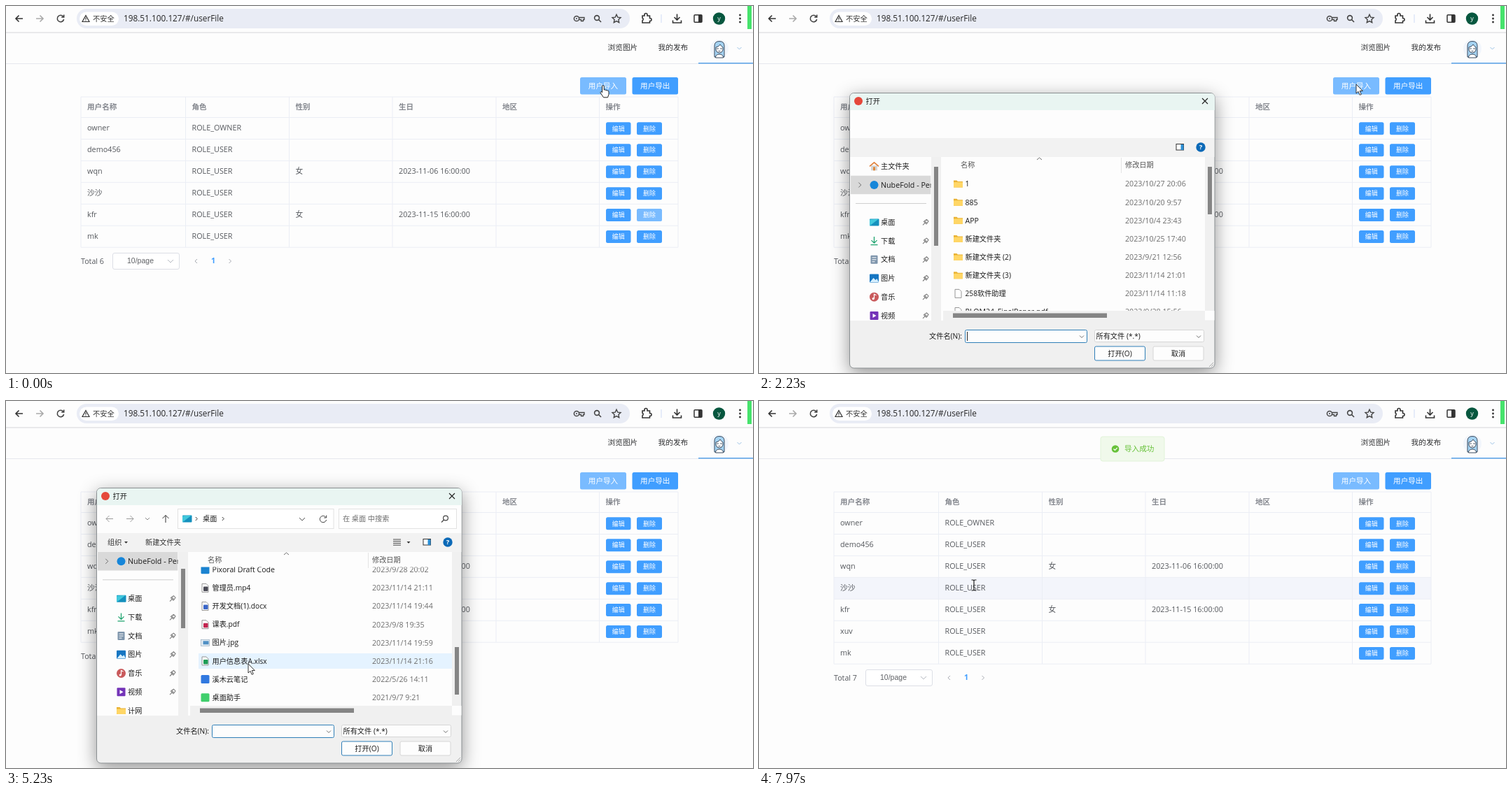
Recreate the animation shown at these times as an HTML page. Size 1067 px wide and 525 px high, loop 8 s.

```html
<!DOCTYPE html>
<html lang="zh">
<head>
<meta charset="utf-8">
<title>User list import</title>
<style>
html, body { margin: 0; width: 100%; height: 100%; overflow: hidden; background: #fdfdfd; }
svg { display: block; width: 100vw; height: 100vh; cursor: default; }
text { font-family: "Open Sans", "Noto Sans CJK SC", "Noto Sans CJK", sans-serif; white-space: pre; }
#frame { filter: drop-shadow(0 7px 13px rgba(0,0,0,.42)); }
</style>
</head>
<body>
<svg id="stage" viewBox="0 0 1067 525"></svg>
<script>
const LOOP = 8000, PITCH = 26.13, ROW = 30.95, TOP = 159.5;
const BLUE = '#409eff', INK = '#1b1b1b', GREY = '#6d6d6d';

// Drawing helpers: y of a text is its vertical centre.
const rect = (x, y, w, h, fill, more = '') => `<rect x="${x}" y="${y}" width="${w}" height="${h}" fill="${fill}" ${more}/>`;
const circle = (x, y, r, fill, more = '') => `<circle cx="${x}" cy="${y}" r="${r}" fill="${fill}" ${more}/>`;
const line = (d, stroke = '#333', w = 1, more = '') => `<path d="${d}" fill="none" stroke="${stroke}" stroke-width="${w}" ${more}/>`;
const shape = (d, fill, more = '') => `<path d="${d}" fill="${fill}" ${more}/>`;
const text = (x, y, s, size = 10.7, fill = INK, more = '') => `<text x="${x}" y="${y + size * .36}" font-size="${size}" fill="${fill}" ${more}>${s}</text>`;
const group = (id, body, more = '') => `<g id="${id}" ${more}>${body}</g>`;
const mid = 'text-anchor="middle"';
const down = (x, y, c = GREY, r = 4) => line(`M${x - r} ${y - r / 2}l${r} ${r}l${r} ${-r}`, c);
const right = (x, y, c = GREY, r = 2.5) => line(`M${x - r / 2} ${y - r}l${r} ${r}l${-r} ${r}`, c);
const arrowLeft = (x, y, c, w = 1) => line(`M${x + 5} ${y}h-10m4.5 -4.5l-4.5 4.5l4.5 4.5`, c, w);
const arrowRight = (x, y, c, w = 1) => line(`M${x - 5} ${y}h10m-4.5 -4.5l4.5 4.5l-4.5 4.5`, c, w);
const reload = (x, y, w = 1) => line(`M${x + 4} ${y - 2.5}A4.7 4.7 0 1 0 ${x + 4.6} ${y + 1}M${x + 4.7} ${y - 5.5}v3.5h-3.5`, '#444', w);
const lens = (x, y, w, side = 1) => circle(x - side, y - 1, 3.4, 'none', `stroke="#444" stroke-width="${w}"`) +
  line(`M${x + side * 1.5} ${y + 1.5}l${side * 3.5} 3.5`, '#444', w);

function browser() {
  return rect(0, 0, 1067, 38, '#fdfdfd') + rect(0, 37.5, 1067, 1, '#d5d6d9') +
    arrowLeft(19, 18, '#333', 1.6) + arrowRight(48, 18, '#aaa', 1.6) + reload(78, 18, 1.6) +
    rect(101, 4, 790, 28, '#e9ecf5', 'rx="14"') + rect(105, 8.5, 56, 19.5, '#fff', 'rx="9.7"') +
    line('M114 13.5l5 9h-10zM114 16.5v3m0 1v1', '#333', 1.2) +
    text(124, 18.5, '不安全', 10.3, '#333') + text(168, 18, '198.51.100.127/#/userFile', 11.8, '#262626') +
    circle(815, 18, 3.6, 'none', 'stroke="#444" stroke-width="1.5"') + circle(815, 18, 1, '#444') +
    line('M818.5 16.5h7.5v3h-1.5v2h-3v-2h-3', '#444', 1.3) + lens(845, 18, 1.6) +
    shape('M872 12.2l1.8 3.9 4.2.5-3.1 2.9.8 4.2-3.7-2.1-3.7 2.1.8-4.2-3.1-2.9 4.2-.5z', 'none', 'stroke="#444" stroke-width="1.4"') +
    line('M909 14h3v-1.5a2 2 0 0 1 4 0V14h3.500v3.500h.5a2 2 0 0 1 0 4h-.5V24H909v-3a2.300 2.300 0 0 0 0-4z', '#333', 1.6) +
    rect(935.5, 12, 1, 12, '#cfdcf5') +
    line('M958.500 11.500v8m-4-3.500l4 4 4-4M952.500 20.500V24h12v-3.500', '#333', 1.6) +
    rect(983, 12.7, 11, 10.600, 'none', 'stroke="#333" stroke-width="1.5" rx="1"') + rect(989, 13, 5, 10, '#333') +
    circle(1018.5, 18, 8.7, '#07573f') + text(1018.5, 17.5, 'y', 9, '#fff', mid) +
    [13, 18, 23].map(y => circle(1048.5, y, 1.4, '#333')).join('') +
    rect(1059, 0, 6, 33, '#46e36c');
}

function nav() {
  return rect(0, 82, 1067, 1, '#e6e8ee') + text(859.5, 59.5, '浏览图片', 10.7, '#303133') +
    text(931.5, 59.5, '我的发布', 10.7, '#303133') + rect(989, 81, 78, 1.6, '#62a8ea') +
    circle(1019, 61, 13, '#f2f6fc') +
    shape('M1012 73V57q0-6.500 7-6.500t7 6.500v16z', '#a5d3f2', 'stroke="#3b4a5e" stroke-width="1"') +
    shape('M1014 59q5-1 6-4 2 3 4 4v4q-1 4-5 4t-5-4z', '#fff', 'stroke="#3b4a5e"') +
    line('M1015 61h3m2 0h3m-5.500 3.500h3', '#3b4a5e', .9) +
    shape('M1013.500 74q0-5 5.500-5t5.500 5z', '#fff', 'stroke="#3b4a5e"') + down(1047.5, 60.5, '#9cc3e6', 3);
}

const button = (x, y, w, h, label, size, fill = BLUE) =>
  rect(x, y, w, h, fill, 'rx="2.5"') + text(x + w / 2, y + h / 2, label, size, '#fff', mid);

function table(id, users) {
  const n = users.length, bottom = TOP + n * ROW, dy = bottom - 345.2;
  const cols = [107, 256.5, 404.5, 552, 700, 847.5, 960];
  const heads = ['用户名称', '角色', '性别', '生日', '地区', '操作'];
  let s = cols.map(x => rect(x - .5, 130, 1, bottom - 130, '#ebeef5')).join('') + rect(107, 129.5, 853, 1, '#ebeef5');
  heads.forEach((h, i) => s += text(cols[i] + 9, 144.5, h, 10.6, '#85888f', 'font-weight="600"'));
  for (let i = 0; i <= n; i++) s += rect(107, TOP + i * ROW - .5, 853, 1, '#ebeef5');
  users.forEach(([name, sex = '', born = ''], i) => {
    const y = TOP + i * ROW + 15.5;
    [name, i ? 'ROLE_USER' : 'ROLE_OWNER', sex, born].forEach((v, c) => s += text(cols[c] + 9, y - .5, v, 10.8, '#55585d'));
    s += button(857, y - 8.700, 35.5, 18, '编辑', 9) + button(901, y - 8.700, 36, 18, '删除', 9);
  });
  return group(id, s + `<g transform="translate(0 ${dy})">` + text(107, 365, 'Total ' + n, 10.7, '#55585d') +
    rect(152.5, 353.5, 95, 23, '#fff', 'stroke="#dcdfe6" rx="2.5"') +
    text(192, 364.5, '10/page', 10.5, '#606266', mid + ' style="font-family:\'Liberation Sans\',sans-serif"') +
    down(235, 365, '#b4b8c0') + line('M273 362l-3 3 3 3', '#a8abb2') + right(320, 365, '#a8abb2', 3) +
    text(296, 364.5, '1', 10.7, BLUE, mid + ' font-weight="700"') + '</g>');
}

const page = (x, y, c) => shape(`M${x - 4.5} ${y - 6}h6l3 3v9h-9z`, '#fff', 'stroke="#8c8c8c" stroke-width=".9"') +
  (c ? rect(x - 2.5, y - 2, 6.5, 6.5, c, 'rx="1"') : '');
const folder = (x, y) => shape(`M${x - 6.5} ${y - 5}h4.5l1.500 1.500h7v8.500h-13z`, '#e9b233') +
  rect(x - 6.5, y - 2.5, 13, 7.500, '#ffd666', 'rx=".8"');
const square = (x, y, c) => rect(x - 6, y - 6, 12, 12, c, 'rx="1.5"');
const disc = (x, y, c) => circle(x, y, 6, c);
const photo = (x, y) => rect(x - 6, y - 4.500, 12, 9, '#e6eef5', 'stroke="#9fb3c4" stroke-width=".8"') + rect(x - 3, y - 2.5, 8, 5, '#4f8fc4');
const desk = (x, y) => rect(x - 6.5, y - 5, 13.5, 10, '#1590bd', 'rx="1"') + shape(`M${x - 6.5} ${y + 5}v-9l13 -1z`, '#41c8dc');
const notes = (x, y) => rect(x - 5, y - 6, 10, 12, '#7d94ab', 'rx="1"') + line(`M${x - 3} ${y - 3}h6m-6 3h6m-6 3h4`, '#fff');
const home = (x, y) => rect(x - 4.5, y - 1, 9, 7, '#d5d5d5') + rect(x - 1.5, y + 1, 3, 5, '#e08a3c') + line(`M${x - 6.5} ${y}l6.500 -5.500l6.500 5.500`, '#e0803a', 1.6);
const save = (x, y) => line(`M${x} ${y - 6}v9m-4 -4l4 4l4 -4M${x - 5} ${y + 5.5}h10`, '#1da36e', 1.3);
const picture = (x, y) => rect(x - 6.5, y - 6, 13, 12, '#1676c2', 'rx="1"') + shape(`M${x - 6} ${y + 5.5}l5 -6l3 3l2 -2l2.500 5z`, '#d5efff');
const music = (x, y) => circle(x, y, 6.5, '#c95a5c') + line(`M${x} ${y + 2.5}v-6.500l3 1.500`, '#fff', 1.2) + circle(x - 1.3, y + 2.500, 1.6, '#fff');
const video = (x, y) => rect(x - 6, y - 6, 12, 12, '#7434b8', 'rx="1"') + shape(`M${x - 2} ${y - 3}l5 3l-5 3z`, '#fff');

const RED = '#c22650', DOC = '#3a66c8';
const files = [
  ['1', '2023/10/27 20:06', folder], ['885', '2023/10/20 9:57', folder], ['APP', '2023/10/4 23:43', folder],
  ['新建文件夹', '2023/10/25 17:40', folder], ['新建文件夹 (2)', '2023/9/21 12:56', folder],
  ['新建文件夹 (3)', '2023/11/14 21:01', folder], ['258软件助理', '2023/11/14 11:18', square, '#34b268'],
  ['PLQM24_FinalPaper.pdf', '2023/9/28 15:56', page, RED], ['FD.txt', '2023/11/3 22:56', page, '#b5b5b5'],
  ['Fenlow Surfer', '2023/6/30 7:54', disc, '#e5483b'], ['lumaTable数据库.docx', '2023/10/12 20:31', page, DOC],
  ['ZTEO Desktop 4.21.5', '2023/5/17 19:47', disc, '#5c9a35'], ['Clipvoro', '2023/6/9 13:44', square, '#4689d8'],
  ['Pixoral Draft Code', '2023/9/28 20:02', square, '#1b83d0'], ['管理员.mp4', '2023/11/14 21:11', page, '#4a4a55'],
  ['开发文档(1).docx', '2023/11/14 19:44', page, DOC], ['课表.pdf', '2023/9/8 19:35', page, RED],
  ['图片.jpg', '2023/11/14 19:59', photo], ['用户信息表A.xlsx', '2023/11/14 21:16', page, '#1f9d57'],
  ['溪木云笔记', '2023/5/26 14:11'.replace('2023', '2022'), square, '#3179e0'], ['桌面助手', '2021/9/7 9:21', square, '#41cf6d']
];
const places = [['主文件夹', home], ['NubeFold - Per', disc], , ['桌面', desk], ['下载', save], ['文档', notes],
  ['图片', picture], ['音乐', music], ['视频', video], ['计网', folder]];
const fileY = i => 254.6 + i * PITCH;

function sidebar() {
  let s = rect(131, 242.700, 114.5, 26.5, '#d9d9d9') + rect(138, 282, 101, 1, '#cfcfcf') + right(144, 256, GREY, 3.500);
  places.forEach(([label, icon] = [], i) => {
    if (!label) return;
    const y = 229.3 + i * 26.7;
    s += icon(164.5, y, '#1686d9') + text(174, y, label, i === 1 ? 10.700 : 10.2);
    if (i > 2 && i < 9) s += line(`M${234} ${y + 4}l3 -3m-2 -2.500l4.500 4.500m-3 -5l3.500 3.500l2 -3l-2.500 -2.500z`, '#7d7d7d', 1.1);
  });
  return s;
}

function fileList() {
  let rows = '', icons = '', blanks = '';
  files.forEach(([name, date, icon, color], i) => {
    const y = fileY(i), cjk = /[^\x00-\x7f]/.test(name);
    rows += text(294.5, y, name, cjk ? 10.2 : 10.600) + text(523, y, date, 10.7, GREY);
    icons += icon(284.5, y, color);
    blanks += i < 6 ? folder(284.5, y) : page(284.5, y);
  });
  return rect(275, 0, 362, 22, '#e5f3ff', 'id="hover"') + rows + group('icons', icons) + group('blanks', blanks);
}

function addressBar() {
  const field = (x, w) => rect(x, 154.5, w, 28, '#fff', 'stroke="#e2e2e2"');
  return arrowLeft(148, 168.5, '#9a9a9a') + arrowRight(177, 168.5, '#9a9a9a') + down(202, 168.5, '#888', 3) +
    line('M228 174v-10.500m-4.500 4.500l4.500 -4.500l4.500 4.500', '#333') + field(245.5, 222.500) + desk(258.500, 168.5) +
    right(272, 168.5, '#333') + text(281, 168.5, '桌面', 10.2) + right(310, 168.5, '#333') + down(423, 169, '#555') +
    reload(453, 169) + field(475.5, 168) + text(481, 168.5, '在 桌面 中搜索', 10.2, GREY) + lens(627, 168.500, 1.2, -1) +
    text(145, 202, '组织', 10.2, '#333') + shape('M169 201h5l-2.500 2.800z', '#333') + text(199, 202, '新建文件夹', 10.2, '#333') +
    line('M553 198h11m-11 2.700h11m-11 2.700h11m-11 2.700h11', '#444') + shape('M572.500 201h5l-2.500 2.800z', '#333');
}

function dialog() {
  const box = (x, y, w, h, stroke) => rect(x, y, w, h, '#fdfdfd', `stroke="${stroke}" rx="2"`);
  return rect(129.5, 124.5, 521.500, 393.500, '#f0f0f0', 'id="frame" rx="6" stroke="#8b9093"') +
    shape('M130 149v-18q0-6 6-6h509q6 0 6 6v18z', '#e9f5f2') + circle(142, 136, 6, '#e5483b') +
    text(152.500, 136, '打开', 10.2) + line('M633 132l8 8m0 -8l-8 8', '#222', 1.1) +
    rect(130, 149, 520.500, 40, '#fdfdfd') + rect(130, 189, 520.500, 27, '#f2f2f2') + group('bar', addressBar()) +
    rect(596, 197.500, 10.500, 8.500, '#fff', 'stroke="#333"') + rect(602.500, 198, 4, 8, '#2d8fd5') +
    circle(631, 202, 6.7, '#0b69b7') + text(631, 202, '?', 9.500, '#fff', mid + ' font-weight="700"') +
    rect(130, 216, 116, 234, '#fdfdfd') + rect(260, 216, 377, 220, '#fdfdfd') + rect(637, 436, 13.500, 13.500, '#fdfdfd') +
    rect(260, 436, 3, 14, '#fdfdfd') + rect(250, 230, 6, 113, '#858585', 'id="sideThumb"') +
    rect(641, 230, 6, 68, '#858585', 'id="thumb"') + rect(277, 439.5, 220, 6.500, '#858585') +
    text(288, 227, '名称', 10.2, '#555') + text(523, 227, '修改日期', 10.2, '#555') +
    line('M397 220l3.500 -3 3.500 3', GREY) + rect(517, 217, 1, 22, '#e5e5e5') +
    `<g clip-path="url(#sideClip)">${group('side', sidebar())}</g><g clip-path="url(#fileClip)">${group('files', fileList())}</g>` +
    text(290, 472.500, '文件名(N):', 10.2, INK, 'text-anchor="end"') + box(294.5, 463.5, 174, 18, '#2f7fb8') +
    text(297, 472.500, files[18][0], 10.2, INK, 'id="picked"') + rect(297, 466, 1, 13, '#222', 'id="caret"') + down(461, 473, GREY, 3) +
    box(479.5, 463.5, 156, 17, '#d6d6d6') + text(481.500, 472.500, '所有文件 (*.*)', 10.2) + down(628, 473, GREY, 3) +
    box(479.5, 487, 72, 20, '#2f7fb8') + text(515.5, 497, '打开(O)', 10.2, INK, mid) +
    box(563, 487, 72, 20, '#d6d6d6') + text(599, 497, '取消', 10.2, INK, mid) +
    line('M643 516l6 -6m-3 6l3 -3', '#aaa');
}

const toast = () => rect(488, 51, 91, 35, '#f0f9eb', 'rx="3" stroke="#e1f3d8"') + circle(509, 68.5, 5.3, '#67c23a') +
  line('M506.500 68.500l2 2 3.300 -3.700', '#fff', 1.2) + text(522, 68.5, '导入成功', 10.6, '#67c23a');

const pointer = () =>
  group('arrow', shape('M0 0V13L3 10.300 5.200 15.300 7.300 14.400 5.200 9.500H9.300Z', '#fff', 'stroke="#222" stroke-width=".9"')) +
  group('busy', circle(12, .5, 5.2, 'none', 'stroke="#8cc8f2" stroke-width="2.600"') +
    group('spin', line('M0 -5.200A5.200 5.200 0 0 1 5.200 0', '#1779c4', 2.600))) +
  group('hand', shape('M-1.500 3q0-1.500 1.300-1.500T1.200 3v5q2-.6 2.500.500 2-.500 2.500.600 1.800-.300 1.800 1.700v3.500l-1.500 4.500H.500l-4-6q-1-1.800.300-2.300.800-.200 1.700 1.200z', '#fff', 'stroke="#222" stroke-width="1"')) +
  group('beam', line('M-3.500 -7.500h2.500l1 1 1 -1h2.500M0 -6.500v13M-3.500 7.500h2.500l1 -1 1 1h2.500', '#222', 1.2));

const users = [['owner'], ['demo456'], ['wqn', '女', '2023-11-06 16:00:00'], ['沙沙'],
  ['kfr', '女', '2023-11-15 16:00:00'], ['mk']];
const clip = (id, ...r) => `<clipPath id="${id}">${rect(...r, '#000')}</clipPath>`;

document.getElementById('stage').innerHTML =
  '<defs>' + clip('sideClip', 131, 216, 114.5, 234) + clip('fileClip', 263, 237.5, 374, 198.5) + '</defs>' +
  rect(0, 0, 1067, 525, '#fdfdfd') + nav() + rect(107, 0, 853, ROW, '#f3f5fb', 'id="rowHover"') +
  button(820, 102, 66, 24.5, '用户导入', 10.6, '#79bbff') + button(894.5, 102, 65.5, 24.5, '用户导出', 10.6) +
  table('before', users) + table('after', [...users.slice(0, 5), ['xuv'], users[5]]) +
  rect(901, TOP + 4 * ROW + 6.8, 36, 18, '#fff', 'id="fade" rx="2.5"') +
  group('toast', toast()) + browser() + group('dialog', dialog()) +
  group('tip', rect(410.5, 358.5, 250, 16.5, '#fbfbfb', 'stroke="#a5a5a5"') +
    text(413, 366.5, '位置: ToolBox (D:\\download\\258\\258Care\\ToolBox)', 10.2, '#575757')) +
  group('cursor', pointer());

const el = id => document.getElementById(id);
const set = (id, k, v) => el(id).setAttribute(k, v);
const show = (id, on) => set(id, 'display', on ? 'inline' : 'none');
const part = (t, start, span) => Math.min(1, Math.max(0, (t - start) / span));
const easeOut = p => 1 - (1 - p) ** 3;
const smooth = p => p * p * (3 - 2 * p);

// Pointer moves: start, span, x and y to reach.
const moves = [[2260, 340, 410, 345], [4400, 750, 346, 376], [6200, 1500, 307, 263.5]];
const notches = [2700, 3050, 3480, 3720, 3960];

function draw(t) {
  let x = 853, y = 112;
  for (const [start, span, tx, ty] of moves) {
    const p = smooth(part(t, start, span));
    x += (tx - x) * p;
    y += (ty - y) * p;
  }
  const scroll = Math.min(353, notches.reduce((sum, n) => sum + 72.7 * easeOut(part(t, n, 110)), 0));
  const loaded = t >= 2350, clicked = t >= 5340, done = t >= 5750;

  show('before', !done);
  show('after', done);
  set('fade', 'opacity', .3 * (1 - part(t, 0, 100)));
  const row = Math.floor((y - TOP) / ROW);
  show('rowHover', t > 6200);
  set('rowHover', 'y', TOP + row * ROW);

  const rise = easeOut(part(t, 5854, 400));
  set('toast', 'opacity', rise);
  set('toast', 'transform', `translate(0 ${-35 * (1 - rise)})`);

  const open = easeOut(part(t, 1920, 180)) * (1 - part(t, 5480, 130)), k = .92 + .08 * open;
  show('dialog', open > 0);
  set('dialog', 'opacity', open);
  set('dialog', 'transform', `translate(390 321) scale(${k}) translate(-390 -321)`);
  show('bar', loaded);
  show('icons', loaded);
  show('blanks', !loaded);
  set('side', 'transform', `translate(0 ${loaded ? -26.7 : 0})`);
  set('sideThumb', 'y', loaded ? 240 : 230);
  set('sideThumb', 'height', loaded ? 85 : 113);
  set('files', 'transform', `translate(0 ${-scroll})`);
  set('thumb', 'y', 230 + scroll * 122 / 353);
  show('hover', loaded && x > 275 && x < 637 && y > 238);
  set('hover', 'y', fileY(Math.floor((y + scroll - 241.6) / PITCH)) - 11);
  set('hover', 'fill', clicked ? '#cce8ff' : '#e5f3ff');
  show('picked', clicked);
  show('caret', !clicked && t % 1060 < 530);
  show('tip', t >= 3010 && t < 3260);

  const hand = t < 930, beam = t > 6200 && x < 324;
  set('cursor', 'transform', `translate(${x} ${y})`);
  show('hand', hand);
  show('beam', beam);
  show('arrow', !hand && !beam);
  show('busy', !hand && t < 1920);
  set('spin', 'transform', `translate(12 .5) rotate(${t * .36})`);
}

function tick() {
  draw(performance.now() % LOOP);
  requestAnimationFrame(tick);
}
tick();
</script>
</body>
</html>
```
